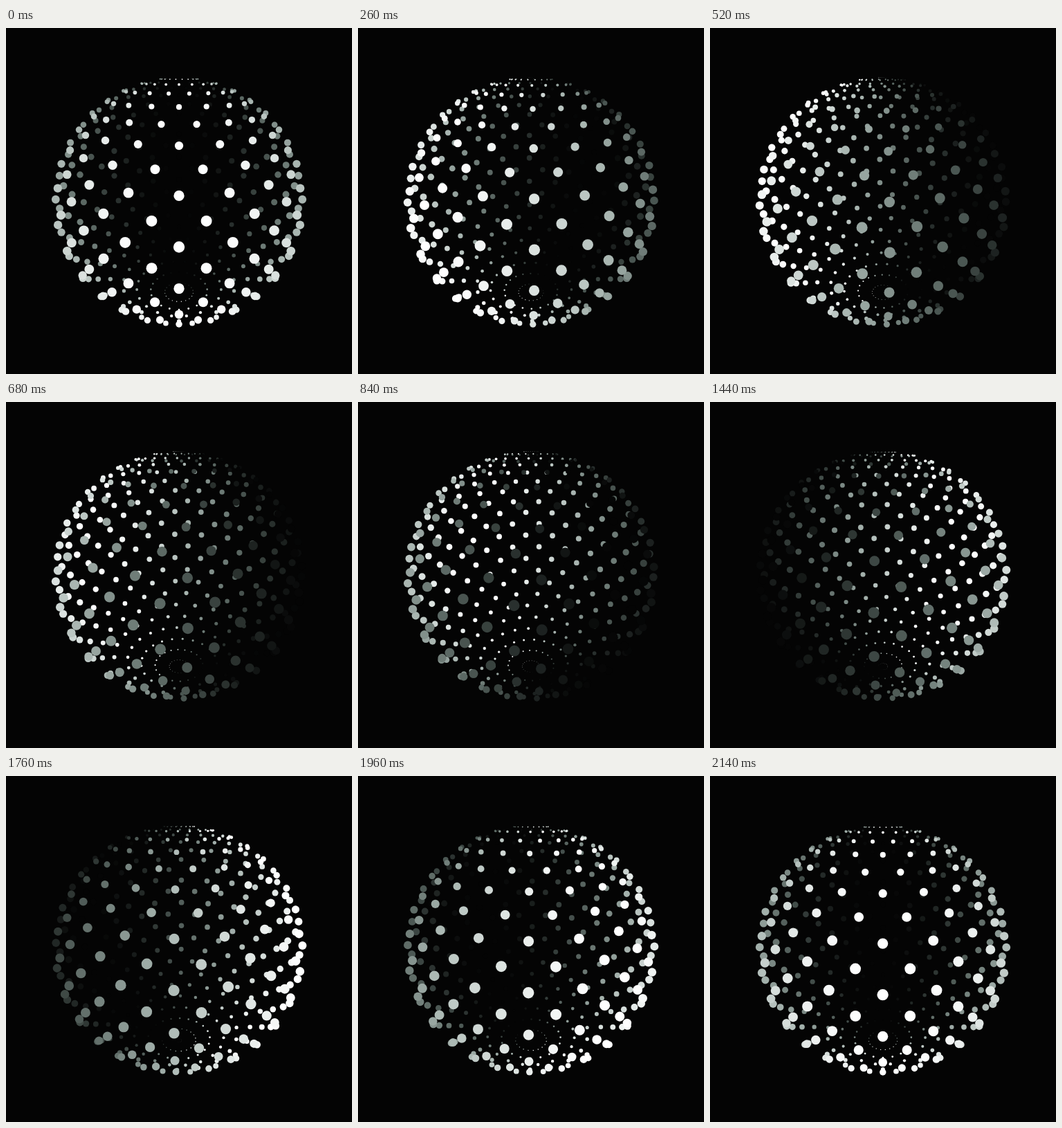
These frames come from a looping animation (500 by 500 pixels, 2160 ms). An HTML page with a canvas:

```html
<!DOCTYPE html>
<html lang="en">
<head>
<meta charset="utf-8">
<title>Dotted sphere</title>
<style>
html, body { margin: 0; width: 100%; height: 100%; overflow: hidden; background: #040404; }
canvas { display: block; width: 500px; height: 500px; }
</style>
</head>
<body>
<canvas id="stage" width="500" height="500"></canvas>
<script>
const ctx = document.getElementById('stage').getContext('2d');
const TAU = Math.PI * 2;
const LOOP = 2160;
const SIZE = 500, MID = SIZE / 2;
const EYE = MID / Math.tan(Math.PI / 6);
const RADIUS = 165, DOT = 5.2;
const ROWS = 22, COLS = 20;
const TILT = 0.4;
const BACK = 4;
const TINT = [0, 14, 9];

// Dark to white, with a cool tint in the middle tones
function shade(b) {
  const [r, g, bl] = TINT.map(c =>
    Math.round(Math.min(255, BACK + (255 - BACK) * b + c * 4 * b * (1 - b))));
  return `rgb(${r},${g},${bl})`;
}

function makeDot(row, col, t) {
  const polar = (row + t) * Math.PI / ROWS;
  const turn = (col + (row + t) / 2) * TAU / COLS;
  const ring = RADIUS * Math.sin(polar);
  const up = RADIUS * Math.cos(polar);
  const out = ring * Math.cos(turn);
  const y = up * Math.cos(TILT) - out * Math.sin(TILT);
  const z = up * Math.sin(TILT) + out * Math.cos(TILT);
  const scale = EYE / (EYE - z);
  return {
    z,
    x: MID + ring * Math.sin(turn) * scale,
    y: MID - y * scale,
    r: DOT * Math.sin(polar) * scale,
    fill: shade((1 + Math.cos(turn + t * TAU)) / 2)
  };
}

function draw(t) {
  ctx.fillStyle = `rgb(${BACK},${BACK},${BACK})`;
  ctx.fillRect(0, 0, SIZE, SIZE);
  const dots = [];
  for (let row = 0; row < ROWS; row++)
    for (let col = 0; col < COLS; col++) dots.push(makeDot(row, col, t));
  dots.sort((a, b) => a.z - b.z);
  for (const d of dots) {
    ctx.fillStyle = d.fill;
    ctx.beginPath();
    ctx.arc(d.x, d.y, Math.max(0, d.r), 0, TAU);
    ctx.fill();
  }
}

const start = performance.now();
function tick() {
  draw((performance.now() - start) % LOOP / LOOP);
  requestAnimationFrame(tick);
}
tick();
</script>
</body>
</html>
```
